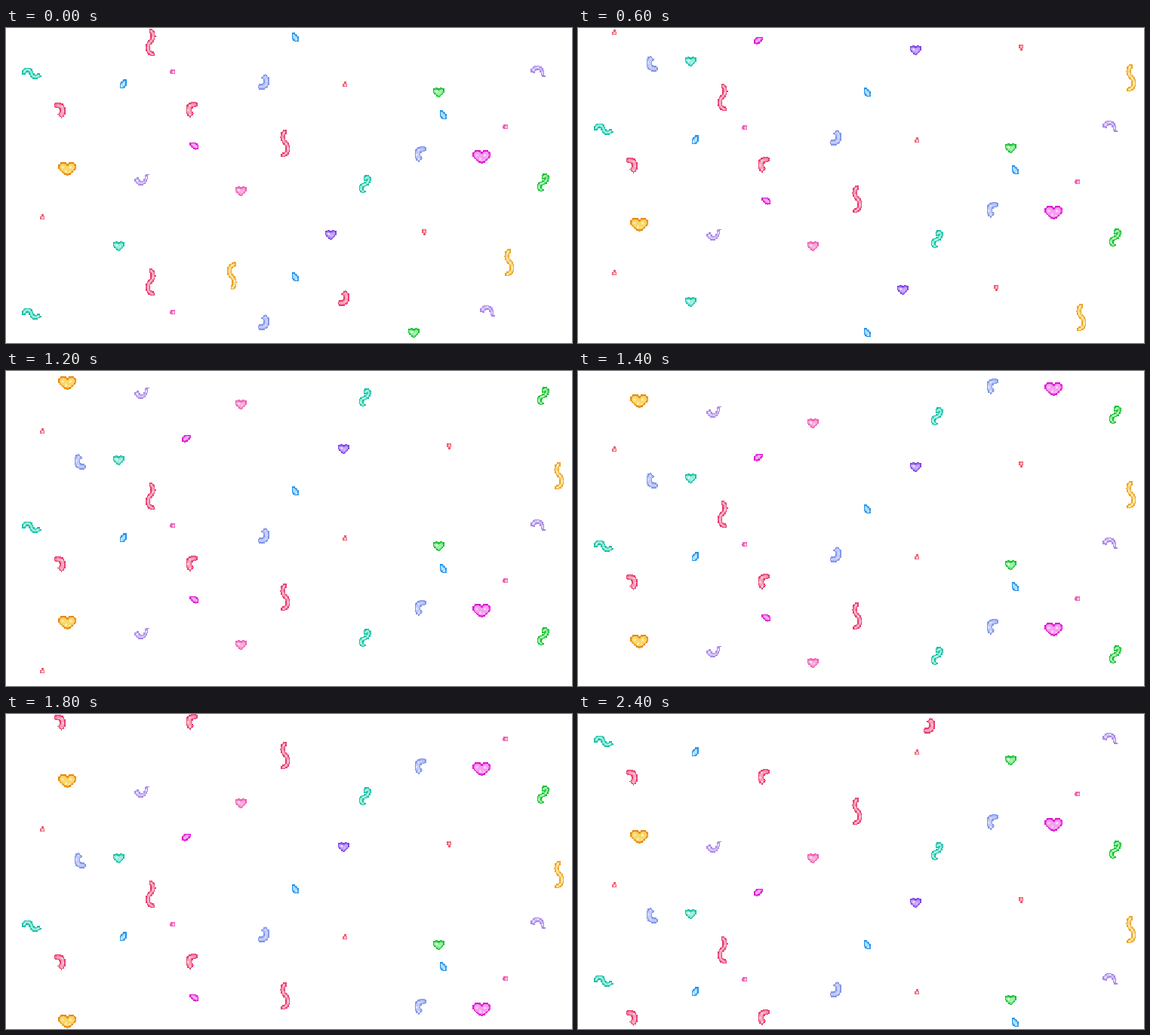
Recreate the animation shown at these times as an HTML page with a canvas. Size 750 by 418 pixels, loop 2.6 s.

```html
<!DOCTYPE html>
<html lang="en">
<head>
<meta charset="utf-8">
<title>Confetti</title>
<style>
html, body { margin: 0; width: 100%; height: 100%; overflow: hidden; background: #fff; }
canvas { display: block; }
</style>
</head>
<body>
<canvas id="stage" width="750" height="418"></canvas>
<script>
const W = 750, H = 418;
const STEP_MS = 200, STEPS = 13, STEP_Y = 24.5, TILE = STEP_Y * STEPS;
const SIZE = 48, PIXEL = 1.5;
const ctx = document.getElementById('stage').getContext('2d');

// [outline, fill]
const COLORS = {
  red: ['#e83a70', '#f8a6b9'],
  rose: ['#ef5268', '#f9b4bb'],
  pink: ['#f05ab6', '#f8a9d6'],
  magenta: ['#dc12d2', '#f79cf0'],
  purple: ['#7d43e2', '#c2a1f7'],
  lavender: ['#a885e6', '#dacafa'],
  peri: ['#8195e8', '#c2ccf9'],
  blue: ['#1f90ea', '#a9dcf9'],
  teal: ['#13bea4', '#96ecdc'],
  green: ['#15bd30', '#93f09f'],
  yellow: ['#eca321', '#fae093'],
  gold: ['#e9860f', '#f9d666']
};

// half: half the height with padding; ribbon: width of an open path;
// shine: highlights as x, y, size
const SHAPES = {
  wave: { half: 18.5, ribbon: 6, path: 'M1 -15.5 C5 -11 5 -5 0 -1 C-5 4 -5 13 3 15.5' },
  curly: { half: 8.5, ribbon: 5.8, path: 'M-9.5 -1 C-8 -7 -1 -6 0 -1 C1 4 5 7 10 3' },
  ess: { half: 12.5, ribbon: 5.8, path: 'M1 -7 C4 -12 7 -8 5 -4 C4 -1 2 0 -1 1 C-6 2 -6 8 -2 9.5' },
  curl: {
    half: 10.3, shine: [[2, -6, 2], [4, 0, 2], [1, 6, 2]],
    path: 'M-7 -8 C-3 -11 8 -10 7 2 C7 6 4 9 2 9.5 L-2 5 C2 3 2 -4 -3 -4 L-7 -5 Z'
  },
  arc: {
    half: 8, shine: [[-6, -2, 2], [0, -6, 2], [6, 1, 2]],
    path: 'M-9 0 C-6 -9 8 -11 9 7 L5 5 C5 0 3 -3 0 -3 C-2 -3 -3 -1 -4 2 Z'
  },
  heart: {
    half: 6.5, shine: [[-4, -3, 3], [1, -1, 2]],
    path: 'M0 6 L-7 -1 C-8.5 -7 -2 -7.5 0 -4 C2 -7.5 8.5 -7 7 -1 Z'
  },
  big: {
    half: 9, shine: [[-8, -4, 3], [-3, 1, 3], [3, -4, 3], [7, -2, 2], [2, 3, 2]],
    path: 'M0 8 C-4 6 -11 2 -11 -3 C-11 -9 -3 -10 0 -5 C3 -10 11 -9 11 -3 C11 2 4 6 0 8 Z'
  },
  drop: {
    half: 6, shine: [[-2, -1, 2], [1, 2, 2]],
    path: 'M-4 -5 C-1 -6 5 0 4.5 3 C4.5 6 1 6 -1 4.5 C-4 3 -4 -1 -4 -5 Z'
  },
  bead: {
    half: 4, shine: [[-1, 0, 2]],
    path: 'M0 -3.5 C1.5 -2 3 -.5 3 .8 C3 3.6 -3 3.6 -3 .8 C-3 -.5 -1.5 -2 0 -3.5 Z'
  },
  seed: {
    half: 9.5, shine: [[0, -1, 2]],
    path: 'M-3.5 0 C-2 -1.5 -.5 -3 .8 -3 C3.6 -3 3.6 3 .8 3 C-.5 3 -2 1.5 -3.5 0 Z'
  }
};

function render(g, { path, ribbon, shine }, [dark, light]) {
  const p = new Path2D(path);
  const line = (style, width) => {
    g.strokeStyle = style;
    g.lineWidth = width;
    g.stroke(p);
  };
  const white = 'rgba(255,255,255,.6)';
  g.lineJoin = g.lineCap = 'round';
  if (ribbon) {
    line(dark, ribbon);
    line(light, ribbon - 3);
    g.lineCap = 'butt';
    g.setLineDash([4, 4]);
    line(white, 1.5);
    return;
  }
  g.fillStyle = light;
  g.fill(p);
  g.fillStyle = white;
  for (const [x, y, s] of shine) g.fillRect(x, y, s, s);
  line(dark, 1.6);
}

// Draws small, hardens the edges and enlarges without smoothing.
function makeSprite(shape, color, turn, flipX, flipY) {
  const small = document.createElement('canvas');
  const n = small.width = small.height = SIZE / PIXEL;
  const g = small.getContext('2d');
  g.translate(n / 2, n / 2);
  g.scale(flipX / PIXEL, flipY / PIXEL);
  g.rotate(turn);
  render(g, shape, color);
  const img = g.getImageData(0, 0, n, n);
  for (let i = 3; i < img.data.length; i += 4) img.data[i] = img.data[i] > 110 ? 255 : 0;
  g.putImageData(img, 0, 0);
  const out = document.createElement('canvas');
  out.width = out.height = SIZE;
  const o = out.getContext('2d');
  o.imageSmoothingEnabled = false;
  o.drawImage(small, 0, 0, SIZE, SIZE);
  return out;
}

const pieces = [];

// tiles: a = one tile above, b = in place, c = one tile below
// pose: l turns the shape left, then x / y mirror it
function add(name, color, x, y, tiles = 'b', pose = '') {
  const flip = k => pose.includes(k) ? -1 : 1;
  const turn = pose.includes('l') ? -Math.PI / 2 : 0;
  const sprite = makeSprite(SHAPES[name], COLORS[color], turn, flip('x'), flip('y'));
  for (const t of tiles) {
    pieces.push({ sprite, x, y: y + TILE * ('abc'.indexOf(t) - 1), half: SHAPES[name].half });
  }
}

add('wave', 'red', 191, 18.5, 'bc');
add('wave', 'red', 370, 153, 'ab', 'x');
add('wave', 'yellow', 667, 310.5, 'b', 'x');
add('wave', 'yellow', 733, -8, 'b', 'x');
add('wave', 'yellow', 299, 329, 'b', 'y');

add('curly', 'teal', 33, 60, 'abc');
add('ess', 'teal', 475, 206.5, 'ab');
add('ess', 'green', 711, 204.5, 'ab');

add('curl', 'red', 71, 108.5, 'ab');
add('curl', 'red', 246, 107.5, 'ab', 'x');
add('curl', 'red', 447, 358, 'b', 'y');
add('curl', 'red', 465, -279, 'b', 'y');
add('curl', 'peri', 549, 167, 'ab', 'x');
add('curl', 'peri', 341, 71, 'bc', 'y');
add('curl', 'peri', 98, -27, 'b', 'xy');

add('arc', 'lavender', 704, 56.5, 'ab');
add('arc', 'lavender', 637, 374.5);
add('arc', 'lavender', 179, 200.5, 'ab', 'y');

add('heart', 'green', 573, 86, 'ab');
add('heart', 'green', 540, 404.5);
add('heart', 'pink', 311, 216.5, 'ab');
add('heart', 'teal', 149, 290, 'ab');
add('heart', 'purple', 430, 274.5);
add('heart', 'purple', 447, -43.5);
add('big', 'magenta', 630, 171, 'ab');
add('big', 'gold', 81, 187, 'ab');

add('drop', 'blue', 383, 11.5, 'bc');
add('drop', 'blue', 155, 74, 'ab', 'x');
add('drop', 'blue', 579, 114.5);
add('drop', 'magenta', 249, 155.5, 'b', 'ly');
add('drop', 'magenta', 239, -58, 'b', 'lxy');

add('bead', 'rose', 449, 75, 'ab');
add('bead', 'rose', 48, 251, 'ab');
add('bead', 'rose', 554, 270, 'b', 'y');
add('bead', 'rose', 587, -48.5, 'b', 'y');
add('seed', 'pink', 221, 58, 'bc');
add('seed', 'pink', 662, 130.5, 'ab');

// Pieces show only while they lie wholly on the stage.
function draw(now) {
  const shift = Math.floor(now / STEP_MS) % STEPS * STEP_Y;
  ctx.clearRect(0, 0, W, H);
  for (const p of pieces) {
    const y = p.y + shift;
    if (y - p.half < -1.2 || y + p.half > H + 1.2) continue;
    ctx.drawImage(p.sprite, p.x - SIZE / 2, Math.round(y) - SIZE / 2);
  }
}

const start = performance.now();
function tick() {
  draw(performance.now() - start);
  requestAnimationFrame(tick);
}
tick();
</script>
</body>
</html>
```
